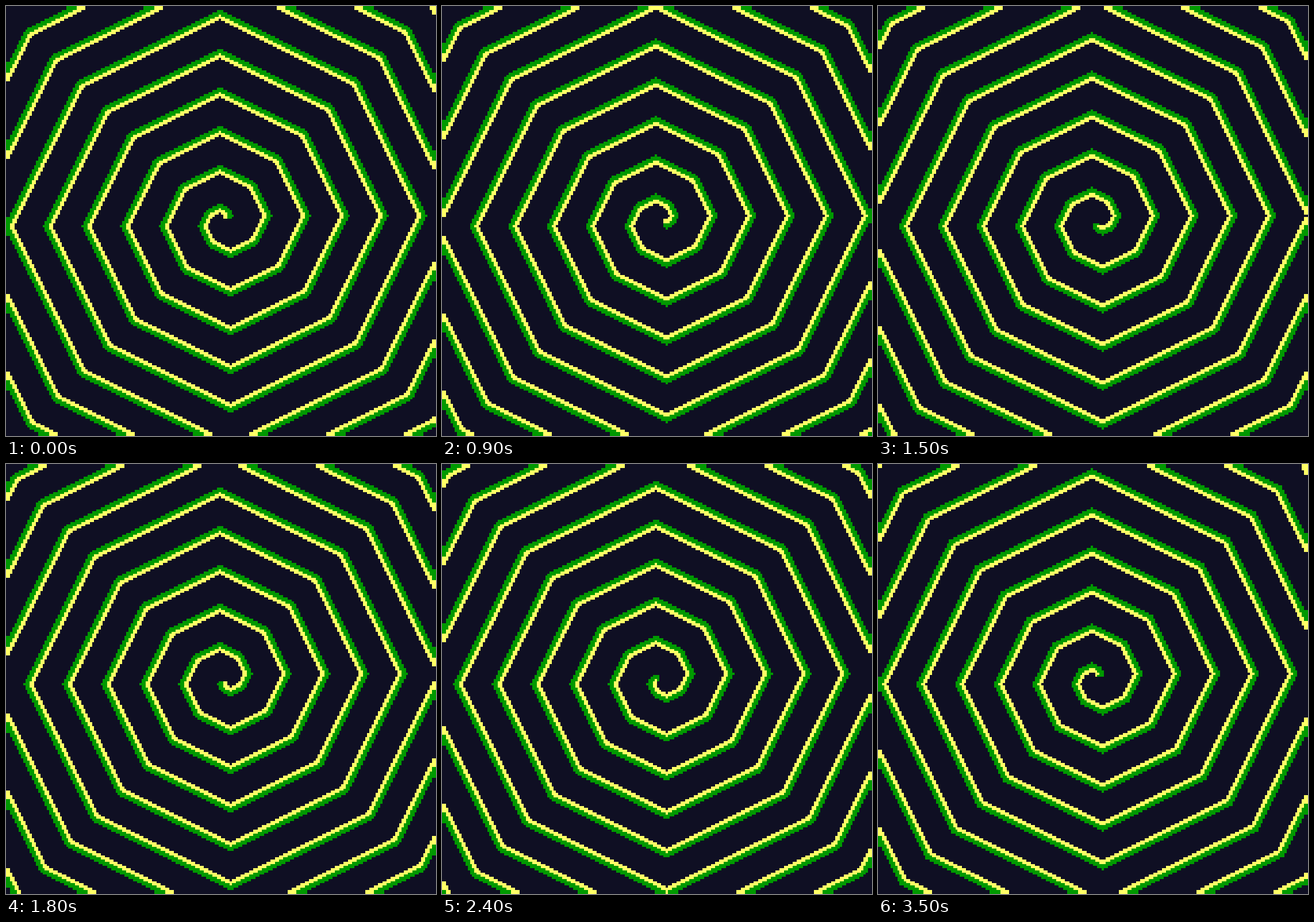
These frames come from a looping animation (748 by 748 pixels, 3600 ms). An HTML page with a canvas:

```html
<!DOCTYPE html>
<html lang="en">
<head>
<meta charset="utf-8">
<title>Spiral wave</title>
<style>
  html, body { margin: 0; width: 100%; height: 100%; overflow: hidden; background: #0f0f23; }
  canvas { display: block; width: 748px; height: 748px; image-rendering: pixelated; }
</style>
</head>
<body>
<canvas id="stage" width="200" height="200"></canvas>
<script>
const SIZE = 200;
const PERIOD = 36;
const STEP_MS = 100;
const START_PHASE = 22;
const GREEN_STEPS = 5;
const YELLOW_STEPS = 4;
const CENTER = { x: 101.5, y: 99.5 };

const ctx = document.getElementById("stage").getContext("2d");
const clampToInner = n => Math.min(SIZE - 2, Math.max(1, n));

// Step at which the wave reaches a cell: straight moves cost 2, diagonal moves 3.
// The wave circles a small core, so each quarter turn starts 9 steps later.
function arrival(col, row) {
  let u = col - CENTER.x;
  let v = row - CENTER.y;
  for (let quarter = 0; quarter < 4; quarter++) {
    const start = quarter * PERIOD / 4;
    const a = -1.5 - u;
    const b = 2.5 - v;
    if (a >= 1 && b >= 0) return start + 2 * Math.max(a, b) + Math.min(a, b);
    if (a === 0 && b >= 2 && b <= 4) return start + 2 * b + 2;
    [u, v] = [v, -u];
  }
  return null;
}

// Cells grouped by their step within the period; border cells copy their inner neighbour.
const cellsByStep = Array.from({ length: PERIOD }, () => []);
for (let row = 0; row < SIZE; row++) {
  for (let col = 0; col < SIZE; col++) {
    const step = arrival(clampToInner(col), clampToInner(row));
    if (step !== null) cellsByStep[step % PERIOD].push([col, row]);
  }
}

function draw(step) {
  ctx.fillStyle = "#0f0f23";
  ctx.fillRect(0, 0, SIZE, SIZE);
  for (let age = 0; age < GREEN_STEPS + YELLOW_STEPS; age++) {
    ctx.fillStyle = age < GREEN_STEPS ? "#009900" : "#ffff66";
    const group = cellsByStep[(START_PHASE + step - age + PERIOD) % PERIOD];
    for (const [col, row] of group) ctx.fillRect(col, row, 1, 1);
  }
}

let shown = -1;
function tick(now) {
  const step = Math.floor(now / STEP_MS) % PERIOD;
  if (step !== shown) draw(shown = step);
  requestAnimationFrame(tick);
}
draw(0);
requestAnimationFrame(tick);
</script>
</body>
</html>
```
